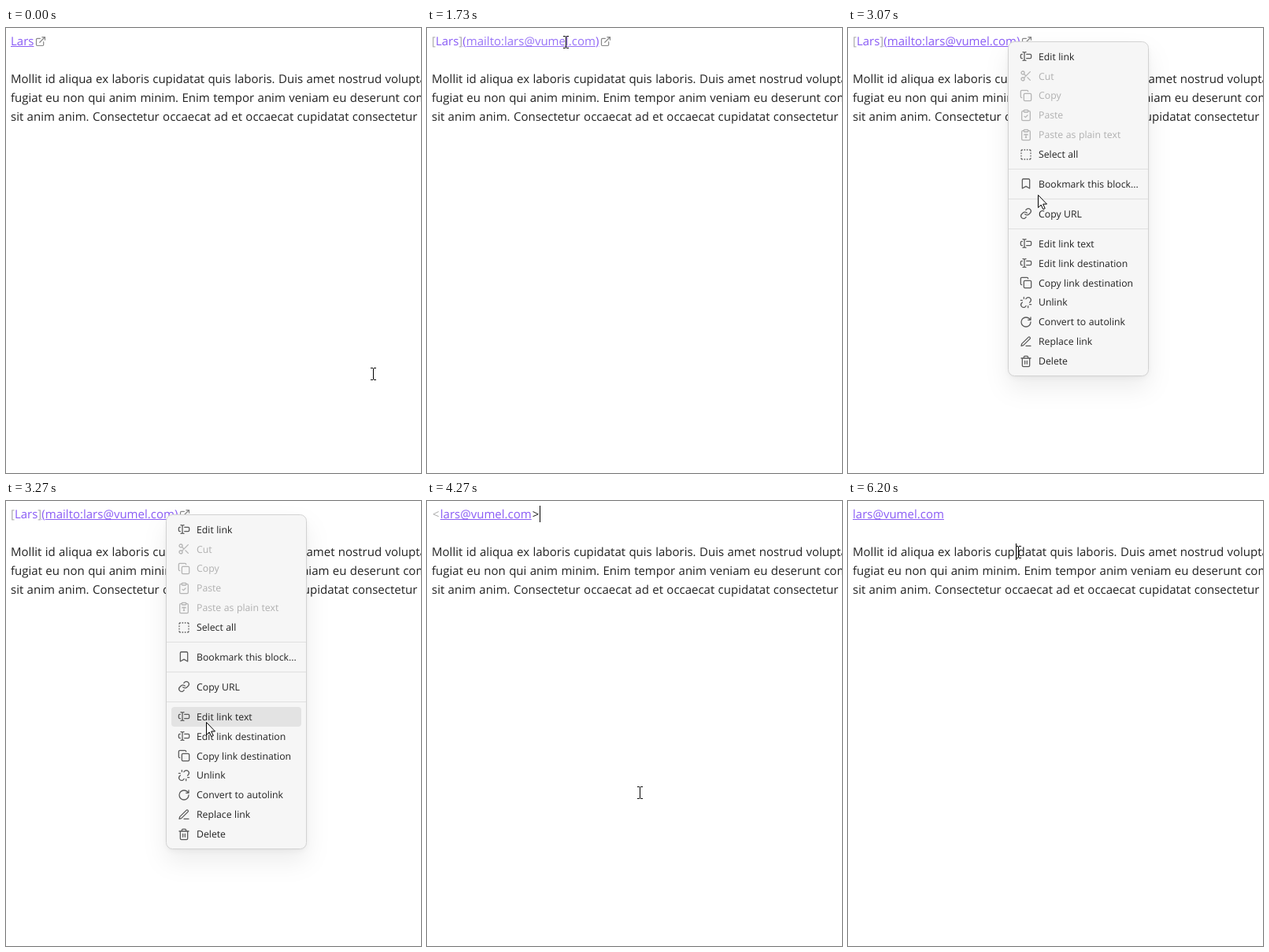
These frames come from a looping animation (527 px wide and 566 px high, 6740 ms). An HTML page:

```html
<!DOCTYPE html>
<html lang="en">
<head>
<meta charset="utf-8">
<title>Convert a link to an autolink</title>
<style>
  html, body { margin: 0; width: 100%; height: 100%; overflow: hidden; background: #fff; }
  #stage { position: relative; width: 527px; height: 566px; overflow: hidden; }
  .line {
    position: absolute; left: 6px; white-space: pre; color: #222;
    font: 15px/24px "Open Sans", "Noto Sans", sans-serif;
    word-spacing: .48px; text-rendering: geometricPrecision;
  }
  .link { color: #8a5cf5; }
  .url { text-decoration: underline; }
  .hover { color: #9873f7; }
  .faint { color: #ababab; }
  .angle { padding: 0 1.1px; }
  svg { position: absolute; left: 0; top: 0; }
  svg text {
    font: 12.25px "Open Sans", "Noto Sans", sans-serif;
    word-spacing: .35px; text-rendering: geometricPrecision; fill: #222;
  }
  .icon { fill: none; stroke: #5a5a5a; stroke-width: 1.9; stroke-linecap: round; stroke-linejoin: round; }
  .off text { fill: #b0b0b0; }
  .off .icon { stroke: #b4b4b4; }
  #panel {
    filter: drop-shadow(0 1px 1px rgba(0,0,0,.03)) drop-shadow(0 3px 4px rgba(0,0,0,.04))
            drop-shadow(0 15px 15px rgba(0,0,0,.07));
  }
</style>
</head>
<body>
<div id="stage">
  <div class="line" id="link" style="top:5px"></div>
  <div class="line" style="top:53px">Mollit id aliqua ex laboris cupidatat quis laboris. Duis amet nostrud voluptate
fugiat eu non qui anim minim. Enim tempor anim veniam eu deserunt commodo
sit anim anim. Consectetur occaecat ad et occaecat cupidatat consectetur</div>
  <svg width="527" height="566" viewBox="0 0 527 566">
    <path id="external" class="icon" style="stroke:#888;stroke-width:2"
      d="M18 13v6a2 2 0 0 1-2 2H5a2 2 0 0 1-2-2V8a2 2 0 0 1 2-2h6M15 3h6v6M10 14 21 3"/>
    <rect id="caret" width="1" fill="#000" shape-rendering="crispEdges"/>
    <g id="menu">
      <rect id="panel" x="203.5" y="17.5" width="178" height="425" rx="8" fill="#f6f6f6" stroke="#d2d2d2"/>
      <rect id="highlight" x="210" width="165" height="25" rx="4" fill="#e3e3e3"/>
      <g id="rows"></g>
    </g>
    <path id="beam" shape-rendering="crispEdges" d="M-3-8h3v1h1v-1h3v1h-3v14h3v1h-3v-1h-1v1h-3v-1h3v-14h-3z"/>
    <path id="arrow" fill="#fff" stroke="#000" stroke-linejoin="round"
      d="M.5.5V16.5L4.2 13 6.8 18.6 9.2 17.5 6.7 12H11.5Z"/>
  </svg>
</div>
<script>
const $ = id => document.getElementById(id);

const board = "M9 2h6a1 1 0 0 1 1 1v2a1 1 0 0 1-1 1H9a1 1 0 0 1-1-1V3a1 1 0 0 1 1-1z" +
  "M16 4h2a2 2 0 0 1 2 2v14a2 2 0 0 1-2 2H6a2 2 0 0 1-2-2V6a2 2 0 0 1 2-2h2";
const icons = {
  edit: "M12 20h-1a2 2 0 0 1-2-2 2 2 0 0 1-2 2H6M13 8h7a2 2 0 0 1 2 2v4a2 2 0 0 1-2 2h-7" +
    "M5 16H4a2 2 0 0 1-2-2v-4a2 2 0 0 1 2-2h1M6 4h1a2 2 0 0 1 2 2 2 2 0 0 1 2-2h1M9 6v12",
  cut: "M3 6a3 3 0 1 1 6 0 3 3 0 1 1-6 0M3 18a3 3 0 1 1 6 0 3 3 0 1 1-6 0M8.1 8.1 12 12M20 4 8.1 15.9M14.8 14.8 20 20",
  copy: "M10 8h10a2 2 0 0 1 2 2v10a2 2 0 0 1-2 2H10a2 2 0 0 1-2-2V10a2 2 0 0 1 2-2z" +
    "M4 16a2 2 0 0 1-2-2V4a2 2 0 0 1 2-2h10a2 2 0 0 1 2 2",
  paste: board + "M9 14l2 2 4-4",
  plain: board + "M9 12v-1h6v1M11 17h2M12 11v6",
  select: "M5 3a2 2 0 0 0-2 2M19 3a2 2 0 0 1 2 2M21 19a2 2 0 0 1-2 2M5 21a2 2 0 0 1-2-2" +
    "M9 3h1M9 21h1M14 3h1M14 21h1M3 9v1M21 9v1M3 14v1M21 14v1",
  bookmark: "M19 21l-7-4-7 4V5a2 2 0 0 1 2-2h10a2 2 0 0 1 2 2z",
  chain: "M10 13a5 5 0 0 0 7.5.5l3-3a5 5 0 0 0-7-7l-1.7 1.7M14 11a5 5 0 0 0-7.5-.5l-3 3a5 5 0 0 0 7 7l1.7-1.7",
  unlink: "M18.8 12.3l1.7-1.8a5 5 0 0 0-7-7l-1.7 1.7M5.2 11.8l-1.7 1.7a5 5 0 0 0 7 7l1.7-1.7" +
    "M8 2v3M2 8h3M16 19v3M19 16h3",
  rotate: "M21 12a9 9 0 1 1-9-9c2.5 0 4.9 1 6.7 2.7L21 8M21 3v5h-5",
  pen: "M12 20h9M16.5 3.5a2.1 2.1 0 0 1 3 3L7 19l-4 1 1-4Z",
  trash: "M3 6h18M19 6v14a2 2 0 0 1-2 2H7a2 2 0 0 1-2-2V6M8 6V4a2 2 0 0 1 2-2h4a2 2 0 0 1 2 2v2M10 11v6M14 11v6"
};

// Menu groups; a third entry marks a disabled item.
const groups = [
  [["edit", "Edit link"], ["cut", "Cut", 1], ["copy", "Copy", 1], ["paste", "Paste", 1],
   ["plain", "Paste as plain text", 1], ["select", "Select all"]],
  [["bookmark", "Bookmark this block..."]],
  [["chain", "Copy URL"]],
  [["edit", "Edit link text"], ["edit", "Edit link destination"], ["copy", "Copy link destination"],
   ["unlink", "Unlink"], ["rotate", "Convert to autolink"], ["pen", "Replace link"], ["trash", "Delete"]]
];

const PITCH = 24.9, GAP = 13;
const enabledRows = [];

function buildMenu() {
  let y = 36, html = "";
  groups.forEach((group, i) => {
    if (i) {
      html += `<path d="M204 ${Math.round(y - PITCH / 2 + GAP / 2)}.5H381" stroke="#e0e0e0"/>`;
      y += GAP;
    }
    for (const [icon, label, off] of group) {
      html += `<g class="${off ? "off" : ""}">
        <path class="icon" d="${icons[icon]}" transform="translate(218 ${Math.round(y) - 8}) scale(.6667)"/>
        <text x="242" y="${Math.round(y + 4.6)}">${label}</text></g>`;
      if (!off) enabledRows.push(y);
      y += PITCH;
    }
  });
  $("rows").innerHTML = html;
}

// All times below are in ticks of 1/15 s.
const LOOP = 6740;
const TYPED = 19, MENU = 40, CONVERTED = 61, RENDERED = 80;

// first tick, last tick, destination x, y
const moves = [
  [1, 10, 76, 18], [23, 26, 176, 18], [29, 32, 203, 16],
  [41, 49, 254, 281], [50, 55, 271, 378], [64, 74, 216, 65]
];

// tick, x, y, height (tick alone hides the caret)
const carets = [
  [0], [17, 50, 5, 24], [TYPED, 233, 5, 24], [26], [34, 233, 5, 24],
  [38, 199, 6, 21], [46], [54, 199, 6, 21], [CONVERTED, 143, 6, 21], [69],
  [77, 213, 54, 21], [85], [93, 213, 54, 21]
];

const mail = "lars@vumel.com";
const span = (cls, text) => `<span class="${cls}">${text}</span>`;

function linkMarkup(tick) {
  if (tick < TYPED) return span("link url", "Lars");
  if (tick < CONVERTED) {
    const hover = tick < MENU ? " hover" : "";
    return span("faint", "[") + span("link", "Lars") + span("faint", "]") + span("link url", "(") +
      span("link url" + hover, "mailto:" + mail) + span("link url", ")");
  }
  const address = span("link url", mail);
  return tick < RENDERED ? span("faint angle", "&lt;") + address + span("angle", "&gt;") : address;
}

function pointer(tick) {
  let x = 466, y = 440;
  for (const [first, last, toX, toY] of moves) {
    const p = Math.min(1, Math.max(0, (tick - first + 1) / (last - first + 1)));
    const ease = p * p * (3 - 2 * p);
    x += (toX - x) * ease;
    y += (toY - y) * ease;
  }
  return [Math.round(x), Math.round(y)];
}

const show = (id, on) => $(id).setAttribute("visibility", on ? "inherit" : "hidden");
const set = (id, attrs) => Object.entries(attrs).forEach(([k, v]) => $(id).setAttribute(k, v));

function draw(tick) {
  const menuOpen = tick >= MENU && tick < CONVERTED;
  const [x, y] = pointer(tick);

  $("link").innerHTML = linkMarkup(tick);
  show("external", tick < CONVERTED);
  set("external", { transform: `translate(${tick < TYPED ? 36.7 : 219.7} 9.7) scale(.61)` });

  const [, cx, cy, height] = carets.filter(c => c[0] <= tick).pop();
  show("caret", height);
  if (height) set("caret", { x: cx, y: cy, height });

  show("menu", menuOpen);
  const row = x > 209 && enabledRows.find(r => Math.abs(r - y) < PITCH / 2);
  show("highlight", menuOpen && row);
  if (row) set("highlight", { y: Math.round(row - PITCH / 2) });

  show("beam", !menuOpen);
  show("arrow", menuOpen);
  set(menuOpen ? "arrow" : "beam", { transform: `translate(${x} ${y})` });
}

function tickAt(ms) {
  const tick = Math.floor(ms * .015 + .06);
  return Math.round(tick * 20 / 3) * 10 > ms ? tick - 1 : tick;
}

let shown = -1;
const start = performance.now();
function frame() {
  const tick = tickAt(Math.max(0, performance.now() - start) % LOOP);
  if (tick !== shown) draw(shown = tick);
  requestAnimationFrame(frame);
}

buildMenu();
frame();
</script>
</body>
</html>
```
